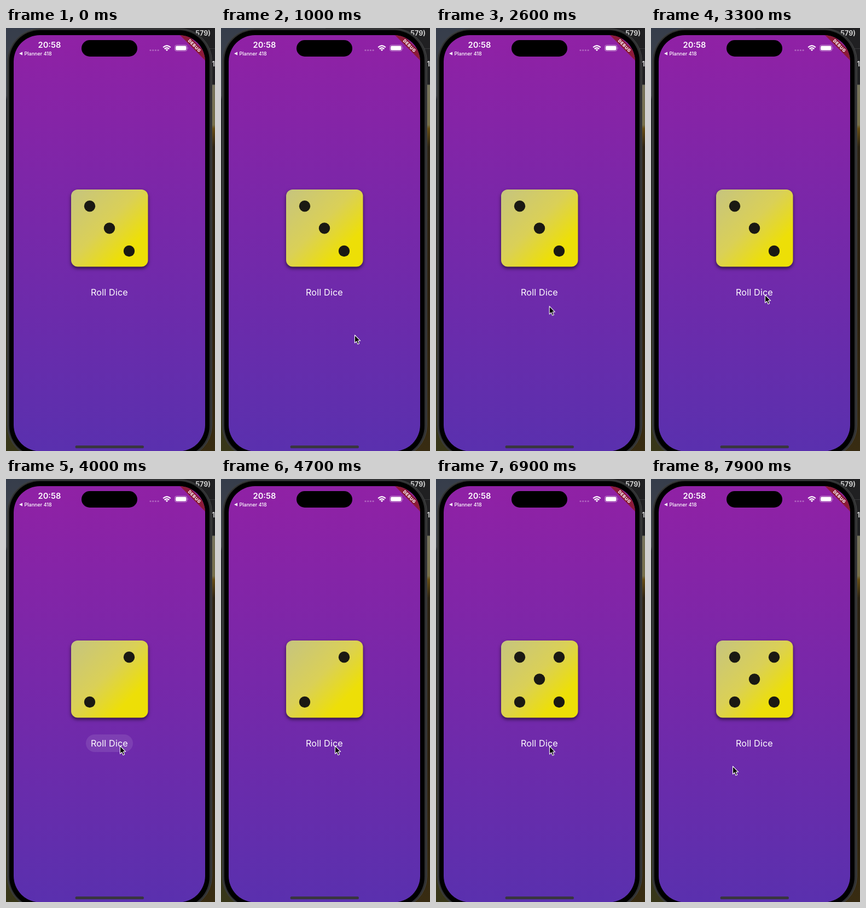
An HTML page that plays this animation: 382x770 px, repeating every 8 s.

```html
<!DOCTYPE html>
<html lang="en">
<head>
<meta charset="utf-8">
<title>Roll Dice</title>
<style>
  html, body { margin: 0; width: 100%; height: 100%; overflow: hidden; background: #000; }
  svg { display: block; width: 382px; height: 770px; }
  text { font-family: Inter, Roboto, sans-serif; fill: #fff; }

  .main, .anti, .press, .cursor, .arrow { animation: 8s infinite; }
  .main { animation-name: main; animation-timing-function: step-end; }
  .anti { animation-name: anti; animation-timing-function: step-end; }
  .press { animation-name: press; animation-timing-function: linear; }
  .cursor { animation-name: move; animation-timing-function: ease-in-out; }
  .arrow { animation-name: appear; animation-timing-function: step-end; }

  /* three, then two, then five */
  @keyframes main { 0% { opacity: 1 } 50% { opacity: 0 } 71.25%, 100% { opacity: 1 } }
  @keyframes anti { 0% { opacity: 0 } 50%, 100% { opacity: 1 } }
  @keyframes appear { 0% { opacity: 0 } 10%, 100% { opacity: 1 } }
  @keyframes press {
    0%, 48.75% { opacity: 0 }
    50%, 52.5% { opacity: 1 }
    56.25%, 70% { opacity: 0 }
    71.25%, 73.75% { opacity: 1 }
    77.5%, 100% { opacity: 0 }
  }
  @keyframes move {
    0%, 10% { transform: translate(284px, 598px); animation-timing-function: ease-out }
    12.5% { transform: translate(244px, 558px); animation-timing-function: ease-out }
    25% { transform: translate(205px, 534px) }
    38.75%, 85% { transform: translate(208px, 485px) }
    98.75%, 100% { transform: translate(149px, 522px) }
  }
</style>
</head>
<body>
<svg viewBox="0 0 382 770">
  <defs>
    <linearGradient id="screen" x2="0" y2="1">
      <stop stop-color="#9021a5"/><stop offset="1" stop-color="#5a30ae"/>
    </linearGradient>
    <linearGradient id="face" x2="1" y2="1">
      <stop stop-color="#c6c47f"/><stop offset=".45" stop-color="#dad057"/>
      <stop offset=".76" stop-color="#eddf08"/><stop offset="1" stop-color="#eddf04"/>
    </linearGradient>
    <linearGradient id="left" x2="0" y2="1">
      <stop stop-color="#363d4b"/><stop offset=".16" stop-color="#42454a"/>
      <stop offset=".17" stop-color="#25282c"/><stop offset=".5" stop-color="#2b2a27"/>
      <stop offset="1" stop-color="#383719"/>
    </linearGradient>
    <linearGradient id="right" x2="0" y2="1">
      <stop stop-color="#77745d"/><stop offset=".11" stop-color="#77704a"/>
      <stop offset=".12" stop-color="#664d14"/><stop offset=".17" stop-color="#2d2414"/>
      <stop offset=".6" stop-color="#2b200f"/><stop offset="1" stop-color="#382c12"/>
    </linearGradient>
    <clipPath id="glass"><rect x="14" y="13" width="350" height="757.5" rx="48"/></clipPath>
    <circle id="pip" r="10.2" fill="#1a1913"/>
  </defs>

  <!-- desktop behind the phone -->
  <rect width="191" height="770" fill="url(#left)"/>
  <rect x="191" y="103" width="191" height="667" fill="url(#right)"/>
  <rect x="191" width="191" height="103" fill="#202022"/>
  <path d="M300 37.5h82M372 103h10" stroke="#39393b"/>
  <text x="374" y="14" font-size="12.5" font-weight="700" text-anchor="end" style="fill:#d0d0d0">579)</text>
  <text x="376.5" y="70" font-size="12.5" font-weight="700" style="fill:#d0d0d0">1</text>

  <!-- phone body -->
  <rect x="2.5" y="1" width="374" height="782" rx="60" fill="#303132" stroke="#434445"/>
  <rect x="6" y="4" width="366" height="776" rx="56" fill="#000"/>

  <g clip-path="url(#glass)">
    <rect x="14" y="13" width="350" height="758" fill="url(#screen)"/>
    <g transform="translate(344.7 32.3) rotate(45)">
      <rect x="-40" y="-5.4" width="80" height="10.6" fill="#8c1b38"/>
      <text y="2.8" font-size="7.6" font-weight="800" letter-spacing=".7" text-anchor="middle">DEBUG</text>
    </g>
  </g>
  <rect x="138" y="22" width="102" height="30" rx="15"/>
  <rect x="126.500" y="760" width="125.500" height="5" rx="2.5" fill="#38363f"/>

  <!-- status bar -->
  <text x="79.500" y="36" font-size="14.7" font-weight="600" text-anchor="middle">20:58</text>
  <path d="M24 46.500l6-3v6z" fill="#fff"/>
  <text x="33.500" y="50" font-size="9" font-weight="500">Planner 418</text>
  <g fill="#fff" fill-opacity=".3">
    <circle cx="264" cy="40.500" r="1.6"/><circle cx="268.700" cy="40.500" r="1.6"/>
    <circle cx="273.400" cy="40.500" r="1.6"/><circle cx="278.100" cy="40.500" r="1.6"/>
  </g>
  <g fill="none" stroke="#fff" stroke-width="2.2">
    <path d="M287.200 35.300q6.800-6.400 13.600 0M289.700 38.100q4.300-4 8.600 0"/>
    <path d="M294 42l-2.300-2.400q2.300-2 4.600 0z" fill="#fff" stroke="none"/>
  </g>
  <rect x="308.500" y="31" width="22.500" height="11" rx="3.500" fill="none" stroke="#fff" stroke-opacity=".45"/>
  <rect x="310" y="32.500" width="19.500" height="8" rx="2.200" fill="#fff"/>
  <path d="M332.300 34.700q1.800 1.800 0 3.600z" fill="#fff" fill-opacity=".5"/>

  <!-- die -->
  <rect x="119" y="294" width="140.500" height="140.500" rx="12" fill="url(#face)"
        style="filter:drop-shadow(0 3px 3px rgba(0,0,0,.6))"/>
  <g class="main">
    <use href="#pip" x="153" y="324.300"/><use href="#pip" x="189" y="364.500"/><use href="#pip" x="225" y="406"/>
  </g>
  <g class="anti">
    <use href="#pip" x="225" y="324.300"/><use href="#pip" x="153" y="406"/>
  </g>

  <!-- button -->
  <rect class="press" x="146" y="465" width="86" height="32" rx="16" fill="#fff" fill-opacity=".1"/>
  <text x="189" y="487" font-size="16.2" letter-spacing=".15" text-anchor="middle">Roll Dice</text>

  <g class="cursor">
    <path class="arrow" d="M.5.8V15.300L3.700 12.300 6 17.600 8.600 16.500 6.300 11.300H10.700Z"
          fill="#000" stroke="#fff" stroke-width="1.1" stroke-linejoin="round"/>
  </g>
</svg>
</body>
</html>
```
